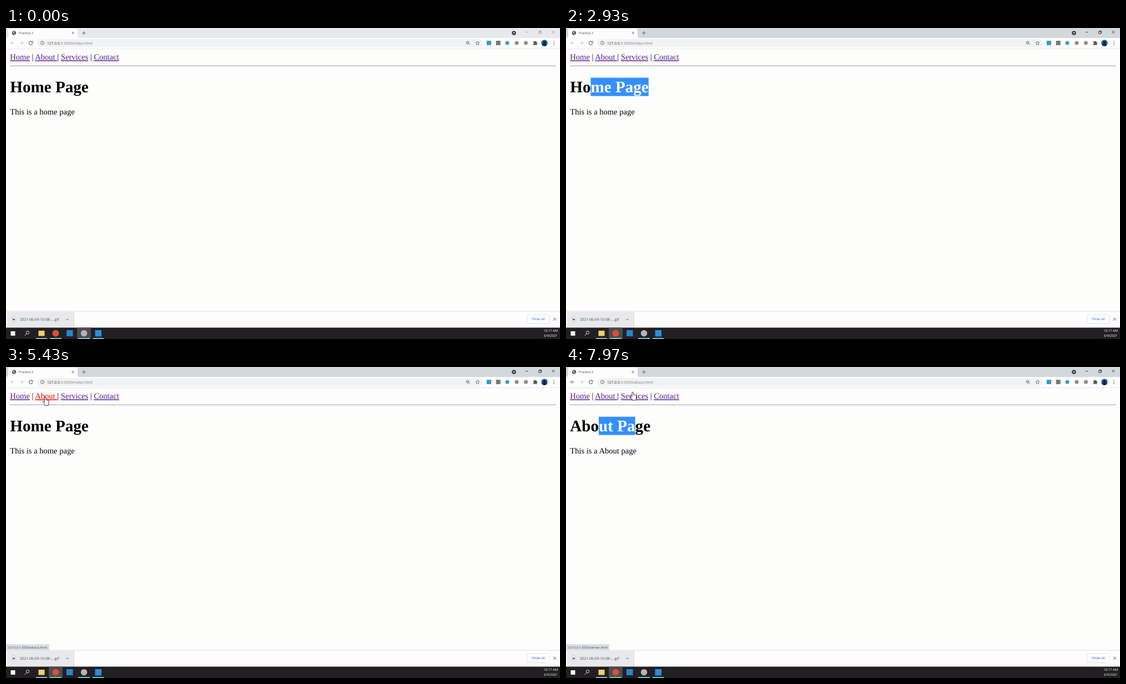
Animation of 998 by 561 pixels, one loop 8000 ms. Source, as an HTML page:

```html
<!DOCTYPE html>
<html lang="en">
<head>
<meta charset="utf-8">
<title>Browser walkthrough</title>
<style>
  html, body { margin: 0; width: 100%; height: 100%; overflow: hidden; background: #fdfdfc; }
  svg { display: block; width: 998px; height: 561px; }
  text { white-space: pre; text-rendering: geometricPrecision; }
  .ui { font-family: "Open Sans", "Noto Sans", sans-serif; fill: #44474b; }
  .page { font: 14.555px "Liberation Serif", "Times New Roman", serif; fill: #000; }
  .link { fill: #551a8b; text-decoration: underline; }
  .link.down { fill: #e00; }
  .line { fill: none; stroke: #5f6368; }
  .faint { stroke: #bcbfc3; }
  #buttons { stroke: #96999c; }
  .focus #buttons { stroke: #222; }
  #strip { fill: #e7e9ed; }
  .focus #strip { fill: #d3d8dc; }
</style>
</head>
<body>
<svg id="stage" viewBox="0 0 998 561">
  <!-- tab strip -->
  <rect id="strip" width="998" height="18"/>
  <path fill="#fdfdfc" d="M0 18Q4 18 4 14V4Q4 1 7 1H126Q129 1 129 4V14Q129 18 133 18Z"/>
  <circle cx="14.5" cy="9" r="3.7" fill="#55585c"/>
  <path d="M12 7.4l2-.9 1.2 1.5-1.6 1.4zM14.6 10.4l2-.8-.7 2-1.2.5z" fill="#e4e6e8"/>
  <text class="ui" x="23" y="11" font-size="5.8">Practice 2</text>
  <path class="line" d="M118.7 7l3.8 3.8m0-3.8l-3.8 3.8M137 9h6.6m-3.3-3.3v6.6"/>
  <circle cx="915" cy="9" r="3.8" fill="#3c4043"/>
  <path d="M913.2 8l1.8 2.2 1.8-2.2z" fill="#fff"/>
  <path id="buttons" fill="none" stroke-width=".8" d="M935.7 7.5h5M959.6 6.5h3.8v3.8h-3.8zM960.8 6.3V5.2h3.8V9h-1M983.5 5l4.8 4.8m0-4.8l-4.8 4.8"/>

  <!-- toolbar -->
  <rect y="18" width="998" height="19" fill="#fdfdfc"/>
  <rect y="37" width="998" height=".7" fill="#dfe1e4"/>
  <path id="back" class="line faint" d="M15 27H8.4m3.1-3.1L8.4 27l3.1 3.1"/>
  <path class="line faint" d="M24.5 27h6.6m-3.1-3.1l3.1 3.1-3.1 3.1"/>
  <path class="line" stroke-width="1.1" d="M47.3 25.2A3.2 3.2 0 1 0 47.9 27.8M47.9 23.7v2.2h-2.2"/>
  <rect x="56" y="20" width="803" height="14.4" rx="7.2" fill="#f0f2f3"/>
  <circle class="line" cx="65.5" cy="27" r="3.2" stroke-width=".8"/>
  <path class="line" stroke-width=".9" d="M65.5 26.5v2.4m0-4v.8"/>
  <text class="ui" x="74" y="29.5" font-size="6.76"><tspan fill="#303236">127.0.0.1</tspan><tspan fill="#77797d">:5500/</tspan><tspan id="file" fill="#77797d">index.html</tspan></text>
  <path class="line" stroke-width=".9" d="M833.6 28.2l2.2 2.2M830.3 26.4h2.8"/>
  <circle class="line" cx="831.7" cy="26.4" r="2.5" stroke-width=".9"/>
  <path class="line" stroke-width=".8" d="M849.5 23.6l1 2.3 2.5.2-1.9 1.7.6 2.4-2.2-1.3-2.2 1.3.6-2.4-1.9-1.7 2.5-.2z"/>
  <rect x="866" y="23" width="8" height="8" fill="#2d9bd8"/>
  <rect x="882.7" y="23" width="8" height="8" fill="#78797c"/>
  <circle cx="903" cy="27" r="3.6" fill="#2f9fd0"/>
  <circle cx="920" cy="27" r="3.6" fill="#8c8e90"/>
  <circle cx="936.5" cy="27" r="3.6" fill="#8c8e90"/>
  <path fill="#505358" d="M949.8 24.6h1.9a1.2 1.2 0 0 1 2.4 0h1.9v1.9a1.2 1.2 0 0 1 0 2.4v2h-2a1.2 1.2 0 0 0-2.3 0h-1.9V29a1.2 1.2 0 0 0 0-2.4z"/>
  <circle cx="970" cy="27" r="5.8" fill="#1765b8"/>
  <path fill="#15223a" d="M966 31.2q0-3 2.6-3.4a2.4 2.4 0 1 1 2.8 0q2.6.4 2.6 3.4a5.8 5.8 0 0 1-8 0z"/>
  <path stroke="#505358" stroke-width="1.4" stroke-dasharray="1.4 1.3" d="M987 23.7v7"/>

  <!-- web page -->
  <text class="page" x="7.3" y="57.3"><tspan class="link">Home</tspan> | <tspan id="about" class="link">About </tspan>| <tspan class="link">Services</tspan> | <tspan class="link">Contact</tspan></text>
  <rect x="7.3" y="67.6" width="983.4" height="1" fill="#9c9ba4"/>
  <rect x="7.3" y="68.6" width="983.4" height=".9" fill="#dcdce2"/>
  <rect id="mark" y="89.7" height="33" fill="#3390ff"/>
  <text class="page" x="7.3" y="115.8" style="font-size:29.11px;font-weight:bold"><tspan id="before"></tspan><tspan id="picked" fill="#fff"></tspan><tspan id="after"></tspan></text>
  <text id="body" class="page" x="7.3" y="155.6"></text>

  <!-- link address -->
  <g id="status">
    <path d="M0 500H76Q78 500 78 502V511H0Z" fill="#dcdfe3"/>
    <text id="address" class="ui" x="2.5" y="507.7" font-size="5.82"></text>
  </g>

  <!-- downloads -->
  <rect y="511" width="998" height="30" fill="#fdfdfc"/>
  <rect y="510.6" width="998" height=".8" fill="#d4d6e0"/>
  <rect x="2" y="511.5" width="120.5" height="29" fill="#e8e9ea"/>
  <rect x="122.3" y="512" width=".8" height="28" fill="#cfd1d4"/>
  <path d="M11.5 521h4l1.8 1.8v7h-5.8z" fill="#fff" stroke="#a6abb0" stroke-width=".6"/>
  <rect x="12.3" y="524" width="3.6" height="3.4" fill="#3f7fa8"/>
  <text class="ui" x="25" y="528.2" font-size="6.6">2021-06-09-10-08-....gif</text>
  <path class="line" d="M108.3 527l2.4-2.4 2.4 2.4"/>
  <rect x="939" y="517" width="40" height="16.5" rx="2" fill="#fff" stroke="#dadce0" stroke-width=".8"/>
  <text class="ui" x="947" y="527.4" font-size="6.2" style="fill:#1a62d0">Show all</text>
  <path class="line" d="M986 522.6l5 5m0-5l-5 5"/>

  <!-- taskbar -->
  <rect y="540.5" width="998" height="20.5" fill="#221f22"/>
  <rect id="tile" y="540.5" width="25" height="20.5" fill="#4d4b4f"/>
  <path fill="#7fd0dc" d="M54 559.3h20v1.7H54zM79 559.3h21v1.7H79zM130 559.3h21v1.7H130zM156 559.3h20v1.7H156z"/>
  <rect x="8.5" y="547" width="8" height="8" fill="#f4f4f4"/>
  <path fill="none" stroke="#eee" stroke-width=".9" d="M37 551.4l-3.3 3.6M41.7 549.3a2.7 2.7 0 1 1-5.4 0a2.7 2.7 0 1 1 5.4 0"/>
  <rect x="58.5" y="546" width="11" height="9.5" fill="#f5cf61"/>
  <circle cx="89.5" cy="550.7" r="6" fill="#d94f3c"/>
  <rect x="109" y="545" width="11.5" height="11" fill="#2385d0"/>
  <circle cx="140.5" cy="550.7" r="5.8" fill="#b4b3b6"/>
  <rect x="160.5" y="545" width="11.5" height="11.5" fill="#2590dc"/>
  <g class="ui" font-size="5.9" text-anchor="end" style="fill:#fff">
    <text x="994" y="548.2">10:17 AM</text>
    <text x="993.5" y="557.2">6/9/2021</text>
  </g>

  <!-- pointers -->
  <g fill="#fff" stroke="#111" stroke-width=".8" stroke-linejoin="round">
    <path id="arrow" d="M0 0V11.8L2.7 9.3 4.5 13.4 6.5 12.5 4.8 8.5H8.5Z"/>
    <path id="hand" d="M-1.2 .9Q0-.6 1.2 .9V5l4.4 1q1.6.5 1.4 2.2L6.2 12V15H-.5V13.6L-4 9.6Q-4.8 8.2-3.5 7.9L-1.2 9.6Z"/>
  </g>
</svg>
<script>
const LOOP = 8000, HOST = '127.0.0.1:5500/';
const $ = id => document.getElementById(id);

// pointer path: time, x, y
const path = [
  [1560, 990, 36], [1730, 511, 68], [1930, 210, 100], [2230, 153, 108], [2420, 149, 108],
  [3050, 8, 108], [3650, 20, 108], [3950, 157, 110], [4200, 177, 112], [4450, 177, 110],
  [4750, 125, 82], [4950, 72, 60], [5200, 70.5, 54], [5700, 70.5, 54], [6150, 126, 106],
  [6400, 125, 107], [6780, 59, 107], [7250, 60, 107], [7600, 100, 72], [7850, 120, 45], [LOOP, 120, 45]
];
const links = [[53, 93, 'about.html'], [99, 148, 'server.html']];

const between = (t, a, b) => t >= a && t < b;
const progress = (t, a, b) => Math.min(1, Math.max(0, (t - a) / (b - a)));
const show = (id, on) => $(id).setAttribute('visibility', on ? 'visible' : 'hidden');

function pointer(t) {
  const i = path.findIndex(p => p[0] > t);
  if (i < 1) return null;
  const [a, b] = [path[i - 1], path[i]], k = progress(t, a[0], b[0]);
  return [a[1] + (b[1] - a[1]) * k, a[2] + (b[2] - a[2]) * k];
}

// selected character range of the heading
function selection(t) {
  if (between(t, 2420, 4350)) return [Math.round(9 - 9 * progress(t, 2420, 3050)), 9];
  if (t >= 6400) return [Math.round(8 - 5 * progress(t, 6400, 6780)), 8];
  return [0, 0];
}

function drawPage(t) {
  const onAbout = t >= 5560;
  const title = onAbout ? 'About Page' : 'Home Page';
  const [from, to] = selection(t);
  $('before').textContent = title.slice(0, from);
  $('picked').textContent = title.slice(from, to);
  $('after').textContent = title.slice(to);
  $('mark').setAttribute('x', 7.3 + (from ? $('before').getComputedTextLength() : 0));
  $('mark').setAttribute('width', to > from ? $('picked').getComputedTextLength() : 0);
  $('body').textContent = `This is a ${onAbout ? 'About' : 'home'} page`;
  $('file').textContent = onAbout ? 'about.html' : 'index.html';
  $('back').classList.toggle('faint', !onAbout);
  $('about').classList.toggle('down', between(t, 5380, 5540));
}

function drawPointer(t) {
  const pos = pointer(t);
  const [x, y] = pos || [0, 0];
  const link = pos && between(y, 44, 61) && links.find(l => between(x, l[0], l[1]));
  const overTitle = between(x, 0, 151) && between(y, 90, 123);
  show('hand', link);
  show('arrow', pos && !link && !overTitle);
  for (const id of ['hand', 'arrow']) $(id).setAttribute('transform', `translate(${x} ${y})`);
  show('status', link);
  $('address').textContent = link ? HOST + link[2] : '';
}

function frame() {
  const t = performance.now() % LOOP, focused = t >= 2420;
  $('stage').classList.toggle('focus', focused);
  $('tile').setAttribute('x', focused ? 77 : 128);
  drawPage(t);
  drawPointer(t);
  requestAnimationFrame(frame);
}
frame();
</script>
</body>
</html>
```
